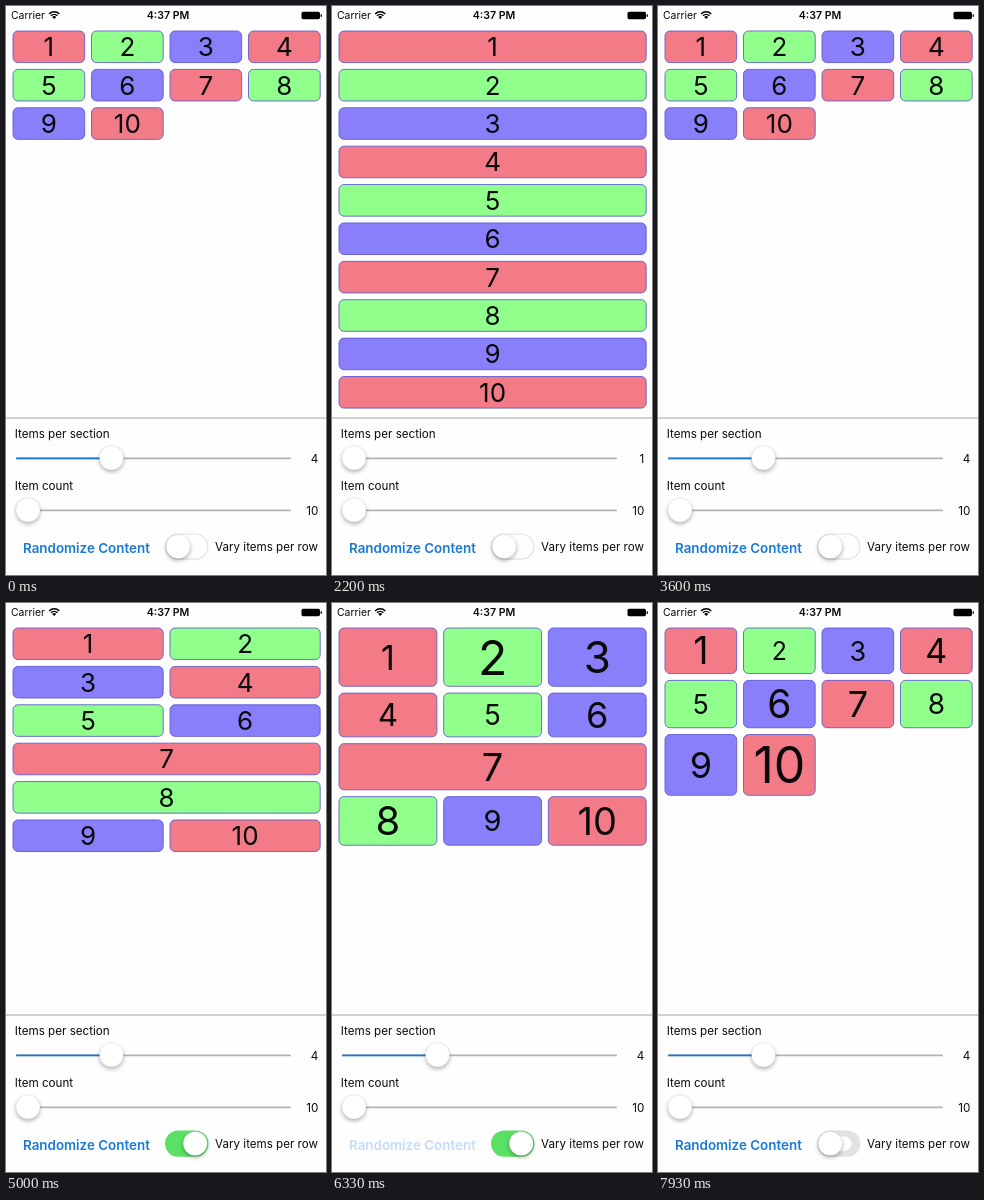
These frames come from a looping animation (320 px wide and 569 px high, 8 s). An HTML page with a canvas:

```html
<!DOCTYPE html>
<html lang="en">
<head>
<meta charset="utf-8">
<style>
  html, body { margin: 0; width: 100%; height: 100%; overflow: hidden; background: #fefefe; }
  canvas { display: block; width: 320px; height: 569px; }
</style>
</head>
<body>
<canvas id="stage"></canvas>
<script>
const LOOP = 8000;
const FONT = 'Inter, Roboto, sans-serif';
const COLORS = ['#f37b88', '#90ff8c', '#897ffa'];
const BLUE = '#1b79d6';
const LEFT = 7, TOP = 25, WIDTH = 307.2, GAP = 6.8, LINE = 1.215;

const canvas = document.getElementById('stage');
const ctx = canvas.getContext('2d');
const ratio = window.devicePixelRatio || 1;
canvas.width = 320 * ratio;
canvas.height = 569 * ratio;

const mix = (a, b, p) => a + (b - a) * p;
function ease(t, start, length) {
  const p = Math.min(1, Math.max(0, (t - start) / length));
  return p * p * (3 - 2 * p);
}

// Every row is as tall as its largest number.
function layout(rows, sizes) {
  const tiles = [];
  let y = TOP;
  for (const count of rows) {
    const first = tiles.length;
    const h = LINE * Math.max(...sizes.slice(first, first + count));
    const w = (WIDTH - GAP * (rows.wide ? 0 : count - 1)) / count;
    for (let i = 0; i < count; i++) {
      tiles.push({ x: LEFT + i * (w + GAP), y, w, h, size: sizes[first + i] });
    }
    y += h + GAP;
  }
  return tiles;
}

// The last row may be short but keeps the column width of a full one.
function grid(columns, sizes) {
  const full = Math.ceil(10 / columns) * columns;
  const padded = [...sizes, ...Array(full - 10).fill(0)];
  return layout(Array(full / columns).fill(columns), padded).slice(0, 10);
}

const even = Array(10).fill(26);
const mixed = [34, 48, 44, 31, 28, 36, 38, 40, 29, 38];
const remixed = [37.5, 25, 27, 34, 27, 39, 36, 28, 36, 50];

const layouts = [
  { at: 0, tiles: grid(4, even) },
  { at: 1750, tiles: grid(1, even) },
  { at: 3200, tiles: grid(4, even) },
  { at: 4400, tiles: layout([2, 2, 2, 1, 1, 2], even) },
  { at: 5520, tiles: layout([3, 3, 1, 3], mixed) },
  { at: 6420, tiles: layout([2, 3, 4, 1], remixed) },
  { at: 7580, tiles: grid(4, remixed) }
];

function text(value, x, y, size, { color = '#0a0a0a', weight = 400, align = 'left' } = {}) {
  ctx.font = `${weight} ${size}px ${FONT}`;
  ctx.textAlign = align;
  ctx.fillStyle = color;
  ctx.fillText(value, x, y);
}

function pill(x, y, w, h, r, color) {
  ctx.beginPath();
  ctx.roundRect(x, y, w, h, r);
  ctx.fillStyle = color;
  ctx.fill();
}

function knob(x, y, r) {
  ctx.save();
  ctx.shadowColor = 'rgba(0,0,0,0.3)';
  ctx.shadowBlur = 4 * ratio;
  ctx.shadowOffsetY = 2 * ratio;
  pill(x - r, y - r, 2 * r, 2 * r, r, '#fff');
  ctx.restore();
  ctx.strokeStyle = 'rgba(0,0,0,0.1)';
  ctx.lineWidth = 0.5;
  ctx.stroke();
}

function drawStatusBar() {
  text('Carrier', 5, 13.3, 10.4);
  text('4:37 PM', 162, 13.3, 10.6, { weight: 600, align: 'center' });
  ctx.strokeStyle = '#000';
  ctx.lineWidth = 1.5;
  for (const r of [7.2, 4.6]) {
    ctx.beginPath();
    ctx.arc(48.2, 13, r, -Math.PI * 0.75, -Math.PI * 0.25);
    ctx.stroke();
  }
  ctx.beginPath();
  ctx.moveTo(48.2, 13);
  ctx.arc(48.2, 13, 2.9, -Math.PI * 0.75, -Math.PI * 0.25);
  ctx.fillStyle = '#000';
  ctx.fill();
  pill(295.5, 5.8, 18.5, 7.4, 1.6, '#000');
  pill(314.6, 8.2, 1.3, 2.8, 0.7, '#000');
}

function drawTiles(t) {
  const current = layouts.findLastIndex(step => step.at <= t);
  const to = layouts[current];
  const from = layouts[Math.max(0, current - 1)];
  const p = ease(t, to.at, 330);
  to.tiles.forEach((end, i) => {
    const value = key => mix(from.tiles[i][key], end[key], p);
    const x = value('x'), y = value('y'), w = value('w'), h = value('h'), size = value('size');
    pill(x, y, w, h, 5, COLORS[i % 3]);
    ctx.strokeStyle = '#5a58cf';
    ctx.lineWidth = 0.85;
    ctx.stroke();
    text(i + 1, x + w / 2, y + h / 2 + size * 0.364, size, { align: 'center' });
  });
}

function drawSlider(label, y, thumb, value) {
  text(label, 8.7, y - 20, 11.65);
  pill(10, y - 0.9, 275, 1.8, 0.9, '#b4b4b4');
  if (thumb > 22.5) pill(10, y - 0.9, thumb - 10, 1.8, 0.9, BLUE);
  knob(thumb, y - 0.5, 12);
  text(value, 312.3, y + 4.3, 11.65, { align: 'right' });
}

function drawSwitch(t) {
  const on = ease(t, 4350, 250) - ease(t, 7600, 250);
  const hollow = 1 - ease(t, 4350, 250) + ease(t, 7700, 400);
  const channel = (off, lit) => Math.round(mix(off, lit, on));
  pill(159, 527.4, 43.5, 26.4, 13.2, `rgb(${channel(226, 91)},${channel(226, 224)},${channel(226, 102)})`);
  const w = 41.1 * hollow, h = 24 * hollow;
  if (hollow > 0.01) pill(180.75 - w / 2, 540.6 - h / 2, w, h, h / 2, '#fefefe');
  knob(mix(172.2, 189.2, on), 540.6, 12);
}

function drawPanel(t) {
  pill(0, 411.5, 320, 158, 0, '#fefefe');
  pill(0, 411.5, 320, 1.1, 0, '#a4a4a8');
  const thumb = 22 + 83.5 * (1 - ease(t, 500, 950) + ease(t, 2400, 650));
  drawSlider('Items per section', 452.4, thumb, t >= 1750 && t < 3200 ? 1 : 4);
  drawSlider('Item count', 504.4, 22, 10);

  const pressed = [5400, 6290].some(at => t >= at && t < at + 120);
  const release = Math.min(ease(t, 5520, 250) + (t < 5400 ? 1 : 0), 1);
  const secondRelease = t < 6290 ? 1 : ease(t, 6410, 250);
  ctx.globalAlpha = pressed ? 0.25 : mix(0.25, 1, Math.min(release, secondRelease));
  text('Randomize Content', 17, 547, 13.4, { color: BLUE, weight: 600 });
  ctx.globalAlpha = 1;

  drawSwitch(t);
  text('Vary items per row', 312, 544.7, 11.6, { align: 'right' });
}

function draw(now) {
  const t = now % LOOP;
  ctx.setTransform(ratio, 0, 0, ratio, 0, 0);
  ctx.fillStyle = '#fefefe';
  ctx.fillRect(0, 0, 320, 569);
  drawStatusBar();
  drawTiles(t);
  drawPanel(t);
}

const start = performance.now();
function tick() {
  draw(performance.now() - start);
  requestAnimationFrame(tick);
}
tick();
</script>
</body>
</html>
```
